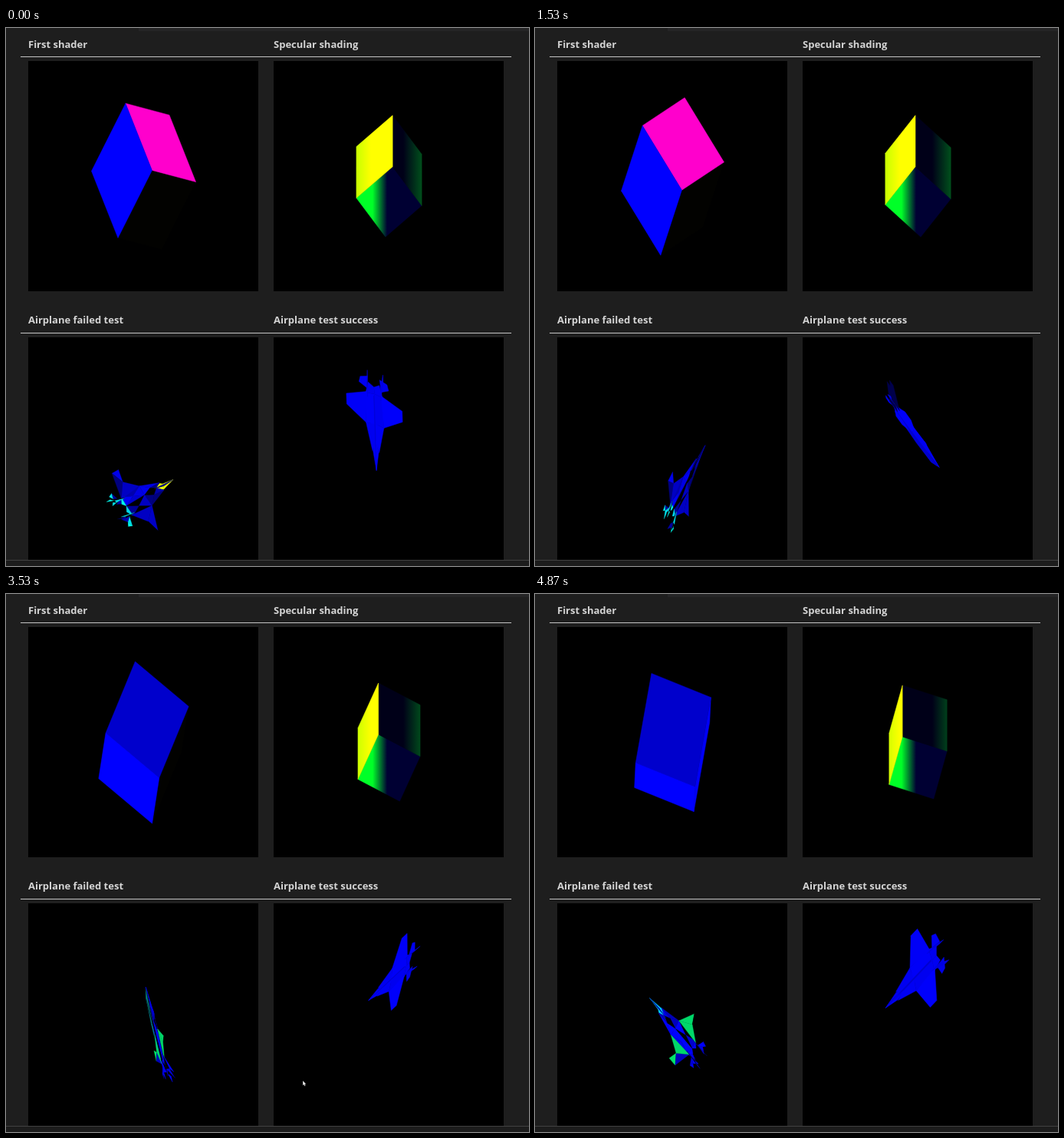
Animation of 682x701 px, one loop 4940 ms. Source, as an HTML page with a canvas:

```html
<!DOCTYPE html>
<html lang="en">
<head>
<meta charset="utf-8">
<title>Shader tests</title>
<style>
html, body { margin: 0; width: 100%; height: 100%; overflow: hidden; background: #1e1e1e; }
#stage { position: relative; width: 682px; height: 701px; overflow: hidden; }
#stage > * { position: absolute; }
canvas { left: 0; top: 0; }
.label { font: bold 13px/18px "Open Sans", "Noto Sans", sans-serif; color: #d4d4d4; white-space: nowrap; }
.rule { left: 19px; width: 640px; height: 1px; background: #c4c4c4; }
.tabs { left: 173px; right: 0; top: 0; height: 4px; background: #252526; }
.footer { left: 0; right: 0; top: 693px; height: 7px; background: #1c1c1c; border-top: 1px solid #414141; }
</style>
</head>
<body>
<div id="stage">
  <canvas id="view" width="682" height="701"></canvas>
  <div class="tabs"></div>
  <div class="label" style="left:29px;top:12px">First shader</div>
  <div class="label" style="left:349px;top:12px">Specular shading</div>
  <div class="rule" style="top:37px"></div>
  <div class="label" style="left:29px;top:371px">Airplane failed test</div>
  <div class="label" style="left:349px;top:371px">Airplane test success</div>
  <div class="rule" style="top:397px"></div>
  <div class="footer"></div>
</div>
<script>
const ctx = document.getElementById('view').getContext('2d');
const LOOP = 4.94, FPS = 15, LAST = 73;
const rad = degrees => degrees * Math.PI / 180;
const add = (...vectors) => vectors.reduce((a, b) => [a[0] + b[0], a[1] + b[1]]);
const scale = (v, k) => [v[0] * k, v[1] * k];
const noise = i => { const v = Math.sin(i * 12.9898 + 4) * 43758.5453; return v - Math.floor(v); };

function fill(points, color, edge = .5) {
  ctx.beginPath();
  points.forEach(p => ctx.lineTo(p[0], p[1]));
  ctx.closePath();
  ctx.fillStyle = ctx.strokeStyle = color;
  ctx.fill();
  if (edge) { ctx.lineWidth = edge; ctx.stroke(); }
}

function ramp(x0, c0, x1, c1) {
  const g = ctx.createLinearGradient(x0, 0, x1, 0);
  g.addColorStop(0, c0);
  g.addColorStop(1, c1);
  return g;
}

// Three visible faces of a cube, given its projected edges.
function cube(centre, left, right, down, leftFill, topFill, lowFill) {
  const a = add(centre, scale(add(left, right, down), -.5));
  const b = add(a, left), c = add(b, down), d = add(a, down);
  const e = add(a, right), f = add(e, down), g = add(c, right);
  fill([c, d, f, g], lowFill);
  fill([a, e, f, d], topFill);
  fill([a, b, c, d], leftFill);
}

// Turns about the horizontal diagonal of its blue face.
function flatCube(t) {
  const turn = rad(-7 + 15.6 * t), cos = Math.cos(turn), sin = Math.sin(turn);
  const diagonal = [79, -1], sum = scale([57.5 * sin, 125 * cos], Math.SQRT2);
  cube([179.5, 193.5],
    scale(add(sum, scale(diagonal, -1)), .5), [57.5 * cos, -125 * sin], scale(add(sum, diagonal), .5),
    '#00f', t < 3.26 ? 'rgb(255,0,204)' : 'rgb(0,0,204)', t < 4.4 ? 'rgb(2,2,0)' : 'rgb(0,0,245)');
}

// Turns about its upright edge.
const glossLeft = ramp(448, 'rgb(175,255,0)', 476, 'rgb(255,255,0)');
const glossTop = ramp(518, 'rgb(0,0,24)', 545, 'rgb(0,88,28)');
const glossLow = ramp(478, 'rgb(0,255,40)', 497, 'rgb(0,0,51)');
function glossCube(t) {
  const turn = rad(38.8 + 7.1 * t), cos = Math.cos(turn), sin = Math.sin(turn);
  cube([499.5, 193], [-60.6 * cos, 65 * sin], [60.6 * sin, 65 * cos], [0, 67], glossLeft, glossTop, glossLow);
}

// Jet parts in nose, wing and up coordinates; one half, mirrored.
const half = s => [
  ['belly', [[.97,0,-.02], [.8,0,-.15], [.4,.1*s,-.16], [-.2,.18*s,-.1], [-.2,0,-.08]]],
  ['nose', [[1,0,0], [.7,.1*s,0], [.55,0,.14]]],
  ['body', [[.7,.12*s,0], [.28,.32*s,0], [.28,0,.12], [.6,0,.14]]],
  ['body', [[.28,.32*s,0], [-.2,.3*s,0], [-.2,0,.1], [.28,0,.12]]],
  ['tail', [[-.2,.3*s,0], [-.38,.2*s,0], [-.32,0,.04], [-.2,0,.1]]],
  ['wing', [[.28,.32*s,0], [.085,s,0], [-.085,s,0], [-.22,.26*s,0]]],
  ['tail', [[-.28,.26*s,0], [-.34,.53*s,0], [-.43,.48*s,0], [-.47,.22*s,0]]],
  ['fin', [[-.14,.24*s,0], [-.36,.25*s,0], [-.5,.28*s,.42], [-.4,.28*s,.42]]]
];
const jet = [...half(-1), ...half(1)];

// Fan of triangles around the centre of a part.
function facets([kind, points]) {
  const centre = [0, 1, 2].map(i => points.reduce((sum, p) => sum + p[i], 0) / points.length);
  return points.map((p, i) => [kind, [centre, p, points[(i + 1) % points.length]]]);
}
const brokenJet = jet.flatMap(facets);

// Under rotation each axis moves on an ellipse: middle + cos * a + sin * b.
const goodOrbit = {
  origin: [[495.6,499], [-10.4,12], [-14.6,-5]],
  nose: [[0,54], [50,0], [0,28]],
  wing: [[4,22.5], [-11,-23.5], [33,-9.5]],
  up: [[10,-19], [0,-25], [-5,9]]
};
const badOrbit = {
  origin: [[179,598], [20,2], [-9,20]],
  nose: [[0,-34], [0,-50], [50,0]],
  wing: [[24,4], [-19,0], [0,36]],
  up: [[-9,-1], [32,0], [0,-8]]
};
function projector(orbit, angle) {
  const axis = ([middle, a, b]) => add(middle, scale(a, Math.cos(angle)), scale(b, Math.sin(angle)));
  const [origin, nose, wing, up] = [orbit.origin, orbit.nose, orbit.wing, orbit.up].map(axis);
  return ([n, w, u]) => add(origin, scale(nose, n), scale(wing, w), scale(up, u));
}

// Seconds and degrees: the jet swings round quickly past the viewer.
const swing = [[0, 87], [1, 52], [2.13, -14], [2.93, -44], [3.53, -143], [4, -155], [4.87, -176]];
function swingAngle(t) {
  const slope = k => (swing[k + 1][1] - swing[k][1]) / (swing[k + 1][0] - swing[k][0]);
  const end = swing.length - 2;
  let i = 0;
  while (i < end && t >= swing[i + 1][0]) i++;
  const tangent = k => {
    if (k === 0) return slope(0);
    if (k > end) return slope(end);
    const l = slope(k - 1), r = slope(k);
    return 2 * l * r / (l + r);
  };
  const [t0, a0] = swing[i], [t1, a1] = swing[i + 1], span = t1 - t0, u = (t - t0) / span;
  return a0 + (a1 - a0) * u * u * (3 - 2 * u) +
    span * u * (1 - u) * ((1 - u) * tangent(i) - u * tangent(i + 1));
}

const goodTone = { nose: 245, body: 248, belly: 215, tail: 242, wing: 255, fin: 225 };
function drawGood(t) {
  const project = projector(goodOrbit, rad(swingAngle(t)));
  const dimFin = t > .5 && t < 3.25;
  jet.forEach(([kind, points], i) => {
    const tone = kind === 'fin' && dimFin ? 75 : goodTone[kind] - (i % 3) * 4;
    fill(points.map(project), `rgb(0,0,${tone})`);
  });
}

function brokenColor(kind, r, t) {
  const isTail = kind === 'tail' || kind === 'fin';
  const isWing = kind === 'wing';
  if (kind === 'nose' && t < 1.3 && r > .72) return 'rgb(235,255,0)';
  if (kind === 'nose' && t > 4.5 && r > .5) return 'rgb(0,210,255)';
  if (isTail && t < 1.6 && r > .6) return `rgb(0,${150 + r * 100 | 0},235)`;
  if (t > 3.27 && (isWing || kind === 'belly') && r > .38)
    return isWing ? `rgb(0,${165 + r * 70 | 0},105)` : `rgb(0,${90 + r * 70 | 0},135)`;
  if (r < .33) return t > 2.6 && t < 3.4 ? 'rgb(0,0,120)' : '#000';
  return `rgb(0,0,${Math.min(255, 60 + r * 190 + (t > 2 ? 60 : 0)) | 0})`;
}
function drawBroken(t) {
  const project = projector(badOrbit, .58 * (2.87 - t));
  brokenJet.forEach(([kind, points], i) => fill(points.map(project), brokenColor(kind, noise(i + 1), t), .3));
}

function drawPointer(t) {
  const u = (t - 3.26) / .81;
  if (u < 0 || u > 1) return;
  const tip = [374 + 39 * u, 690 - 61 * Math.sin(Math.PI * u / .92)];
  const arrow = [[0,0], [0,6], [1.4,4.8], [2.4,7], [3.3,6.5], [2.4,4.5], [4,4.3]];
  fill(arrow.map(p => add(tip, p)), '#e8e8e8', 0);
}

function draw(seconds) {
  const frame = Math.min(LAST, Math.floor((seconds % LOOP + .005) * FPS)), t = frame / FPS;
  ctx.clearRect(0, 0, 682, 701);
  ctx.fillStyle = '#000';
  for (const x of [29, 349]) {
    ctx.fillRect(x, 43, 300, 300);
    ctx.fillRect(x, 403, 300, 290);
  }
  flatCube(t);
  glossCube(t);
  drawBroken(t);
  drawGood(t);
  drawPointer(t);
}

const start = performance.now();
function tick() {
  draw((performance.now() - start) / 1000);
  requestAnimationFrame(tick);
}
tick();
</script>
</body>
</html>
```
